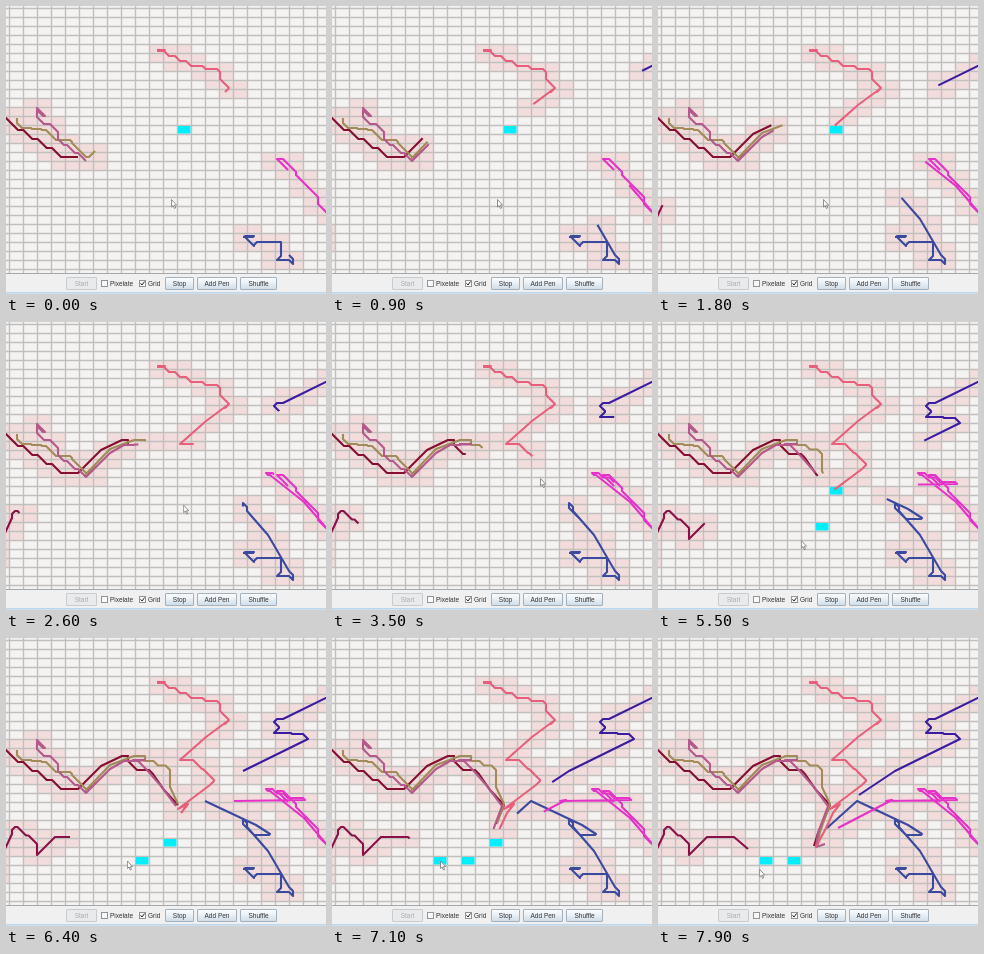
These frames come from a looping animation (320 by 288 pixels, 8 s). An HTML page with a canvas:

```html
<!DOCTYPE html>
<html lang="en">
<head>
<meta charset="utf-8">
<title>Wandering pens</title>
<style>
  html, body { margin: 0; width: 100%; height: 100%; overflow: hidden; background: #f4f3f1; }
  #stage { position: relative; width: 320px; height: 288px; overflow: hidden; }
  canvas, #bar, #cursor { position: absolute; left: 0; top: 0; }
  #bar {
    top: 267px; width: 320px; height: 21px; box-sizing: border-box;
    background: linear-gradient(#f0f0f0 18px, #b5d0e5 18px, #d5e6f3);
    border-top: 1px solid #a5a8aa;
    font: 6.5px/13px "Liberation Sans", Arial, sans-serif; color: #333;
  }
  #bar span { position: absolute; top: 3px; height: 13px; white-space: nowrap; }
  #bar .button {
    box-sizing: border-box; text-align: center; line-height: 12px;
    border: 1px solid #a3b0bd; border-radius: 1px;
    background: linear-gradient(#fbfcfd, #e8eff5 50%, #cfdde9);
  }
  #bar .off { color: #a9abad; border-color: #c9ccce; background: #e9eaeb; }
  #bar i {
    position: absolute; top: 6px; width: 7px; height: 7px; box-sizing: border-box;
    border: 1px solid #8e969d; background: #fafafa;
  }
  #bar svg { position: absolute; left: 0; top: 0; width: 5px; height: 5px; }
</style>
</head>
<body>
<div id="stage">
  <canvas id="board" width="320" height="267"></canvas>
  <div id="bar">
    <span class="button off" style="left:60px;width:31px">Start</span>
    <i style="left:95px"></i><span style="left:104px">Pixelate</span>
    <i style="left:133px"><svg viewBox="0 0 5 5"><path d="M.5 2.3 2 4 4.6.5" fill="none" stroke="#222"/></svg></i>
    <span style="left:142px">Grid</span>
    <span class="button" style="left:159px;width:29px">Stop</span>
    <span class="button" style="left:191px;width:40px">Add Pen</span>
    <span class="button" style="left:234px;width:37px">Shuffle</span>
  </div>
  <svg id="cursor" width="8" height="11" viewBox="0 0 8 11">
    <path d="M.5.5V8L2.2 6.5 3.4 9.5 4.6 9 3.4 6.1H5.6Z" fill="#fff" stroke="#777" stroke-width=".8"/>
  </svg>
</div>
<script>
const LOOP = 8000, TICK = 100;
const CELL_W = 14, CELL_H = 9, LEFT = 3, TOP = 2;
const STRIDE = 13, REACH = 4;
const ctx = document.getElementById('board').getContext('2d');
const cursor = document.getElementById('cursor');

const mix = (a, b, u) => a + (b - a) * u;
const gap = (a, b) => Math.hypot(b[0] - a[0], b[1] - a[1]);
const parse = text => text.split(' ').map(p => p.split(',').map(Number));

// A wandering pen alternates a straight stride along its main axis with a diagonal one.
function stairs([x, y], [x1, y1]) {
  const dx = x1 - x, dy = y1 - y;
  const steps = Math.max(1, Math.round(Math.max(Math.abs(dx), Math.abs(dy)) / STRIDE));
  const diagonal = Math.min(Math.abs(dx), Math.abs(dy)) / steps;
  const out = [];
  for (let i = 1; i <= steps; i++) {
    const ex = x + dx * i / steps, ey = y + dy * i / steps;
    out.push([ex - Math.sign(dx) * diagonal, ey - Math.sign(dy) * diagonal], [ex, ey]);
  }
  return out;
}

const wander = (from, keys) =>
  keys.flatMap((key, i) => stairs(i ? keys[i - 1] : from, key));

// Each pen has a drawn trail, then hunts, wanders, hunts and closes in.
const phaseEnds = [0, 1900, 4400, 6400, 7900];
const pens = [];
function pen(color, trail, ...phases) {
  const [first, ...rest] = parse(trail);
  const legs = [[first, ...wander(first, rest)]];
  phases.map(parse).forEach((keys, i) => {
    const from = legs[i][legs[i].length - 1];
    legs.push(i === 1 ? wander(from, keys) : keys);
  });
  pens.push({ color, legs });
}

pen('#8a1048', '-22,256', '6,196', '9,189 31,206 31,217', '49,199 64,199', '76,199 90,211');
pen('#850f30', '-2,112 12,124 55,151 72,151', '95,128 116,118', '122,118 131,132 147,136', '158,152 172,167', '160,195 156,208');
pen('#a18b58', '11,112 16,122 36,124 50,134 66,136 80,151 89,145', '80,152 104,127 128,118', '139,118 140,123 164,132', '164,149 172,166', '162,194 159,208');
pen('#b3598b', '30,102 39,110 31,104 38,118 52,126 58,139 80,155', '104,131 118,123', '139,122 126,123 140,131', '155,148 170,168', '160,195 158,209 167,206');
pen('#3b499f', '237,231 248,230 238,231 248,240 251,236 275,236 271,254 287,258 283,249', '262,213 241,189', '237,181 248,197 264,196', '250,187 199,163', '169,190');
pen('#e632c8', '282,164 271,153 290,166 302,181 312,191 322,208', '298,180 264,153', '260,151 282,160 299,162', '228,163', '234,162 180,190');
pen('#3b1ca0', '340,50', '277,81', '268,84 273,89 268,95 286,96 302,101', '237,133', '201,157');
pen('#e85f7c', '151,44 159,44 152,45 185,60 214,66 223,82 219,86', '223,82 200,99 174,122', '182,122 196,131 208,142 204,147', '172,171 182,166 175,175', '168,190 158,209');

const targets = [
  { col: 12, row: 13, from: 0, until: 1900 },
  { col: 12, row: 18, from: 4200, until: 5700 },
  { col: 11, row: 22, from: 4900, until: 7300 },
  { col: 9, row: 24, from: 6000, until: LOOP },
  { col: 7, row: 24, from: 7100, until: LOOP }
];
const cellX = col => LEFT + col * CELL_W;
const cellY = row => TOP + row * CELL_H;

// The mouse rests, swings away, then clicks each later target into place.
const mouse = [
  { t: 0, x: 165, y: 193 }, { t: 2400, x: 165, y: 193 }, { t: 3500, x: 208, y: 156 },
  ...targets.slice(1).map(c => ({
    t: c.from, x: cellX(c.col) + CELL_W / 2, y: cellY(c.row) + CELL_H / 2
  })),
  { t: LOOP, x: 101, y: 231 }
];

function partOf(points, share) {
  let left = share * points.slice(1).reduce((sum, p, i) => sum + gap(points[i], p), 0);
  const out = [];
  for (let i = 1; i < points.length && left > 0; i++) {
    const a = points[i - 1], b = points[i], d = gap(a, b);
    const u = d ? Math.min(1, left / d) : 1;
    out.push([mix(a[0], b[0], u), mix(a[1], b[1], u)]);
    left -= d;
  }
  return out;
}

function trailAt(legs, t) {
  const trail = [...legs[0]];
  for (let i = 1; i < legs.length && t > phaseEnds[i - 1]; i++) {
    const share = Math.min(1, (t - phaseEnds[i - 1]) / (phaseEnds[i] - phaseEnds[i - 1]));
    trail.push(...partOf([trail[trail.length - 1], ...legs[i]], share));
  }
  return trail;
}

function tintAround(x, y) {
  for (const sx of [-REACH, REACH]) for (const sy of [-REACH, REACH]) {
    const col = Math.floor((x + sx - LEFT) / CELL_W);
    const row = Math.floor((y + sy - TOP) / CELL_H);
    ctx.fillRect(cellX(col), cellY(row), CELL_W, CELL_H);
  }
}

function tintCells(trail) {
  for (let i = 1; i < trail.length; i++) {
    const a = trail[i - 1], b = trail[i], n = Math.ceil(gap(a, b) / 4) || 1;
    for (let j = 0; j <= n; j++) tintAround(mix(a[0], b[0], j / n), mix(a[1], b[1], j / n));
  }
}

function drawGrid() {
  ctx.strokeStyle = '#c0bfbd';
  ctx.lineWidth = 1.4;
  ctx.beginPath();
  for (let x = LEFT + .5; x < 320; x += CELL_W) { ctx.moveTo(x, 0); ctx.lineTo(x, 267); }
  for (let y = TOP + .5; y < 267; y += CELL_H) { ctx.moveTo(0, y); ctx.lineTo(320, y); }
  ctx.stroke();
}

function drawTrail(color, trail) {
  ctx.strokeStyle = color;
  ctx.beginPath();
  trail.forEach(([x, y]) => ctx.lineTo(x, y));
  ctx.stroke();
}

function moveCursor(t) {
  const i = mouse.findIndex(m => m.t > t);
  const a = mouse[i - 1], b = mouse[i];
  const u = Math.sin((t - a.t) / (b.t - a.t) * Math.PI / 2);
  cursor.style.transform = `translate(${mix(a.x, b.x, u)}px, ${mix(a.y, b.y, u)}px)`;
}

function draw(t) {
  const trails = pens.map(p => trailAt(p.legs, t));
  ctx.fillStyle = '#f4f3f1';
  ctx.fillRect(0, 0, 320, 267);
  ctx.fillStyle = '#f3dddc';
  trails.forEach(tintCells);
  drawGrid();
  ctx.fillStyle = '#00eeff';
  for (const { col, row, from, until } of targets) {
    if (t >= from && t < until) ctx.fillRect(cellX(col) + 1, cellY(row) + 1, CELL_W - 1.5, CELL_H - 1.5);
  }
  ctx.lineWidth = 2.1;
  ctx.lineJoin = 'round';
  trails.forEach((trail, i) => drawTrail(pens[i].color, trail));
  moveCursor(t);
}

const start = performance.now();
function frame() {
  const t = (performance.now() - start) % LOOP;
  draw(Math.floor(t / TICK) * TICK);
  requestAnimationFrame(frame);
}
frame();
</script>
</body>
</html>
```
